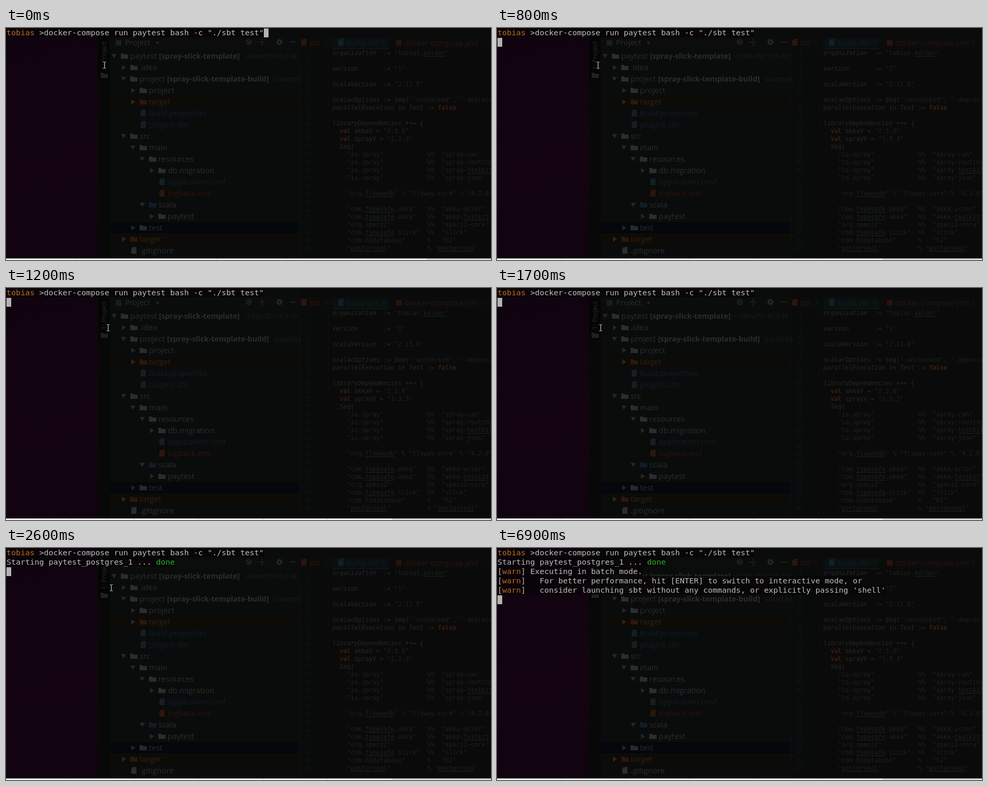
An HTML page that plays this animation: 933 by 446 pixels, repeating every 8 s.

```html
<!DOCTYPE html>
<html lang="en">
<head>
<meta charset="utf-8">
<title>Terminal test run</title>
<style>
html, body { margin: 0; width: 100%; height: 100%; overflow: hidden; background: #0a0a0a; }
#stage { position: absolute; left: 0; top: 0; width: 933px; height: 446px; overflow: hidden; background: #0a0a0a; }
#stage > * { position: absolute; }
#wall { left: 0; top: 0; width: 177px; height: 443px; background: linear-gradient(170deg, #100310, #140412 60%, #11030f); }
#ide { left: 0; top: 0; font: 15px "Open Sans", "Noto Sans", sans-serif; }
#ide > :not(rect) { opacity: .6; }
pre { margin: 0; top: 41px; font: 11.63px/15px "DejaVu Sans Mono", monospace; color: #343638; opacity: .65; }
#code { left: 628px; }
#code b { color: #52290f; font-weight: 400; }
#code b.lit { font-weight: 700; }
#code s { color: #272e28; text-decoration: none; }
#code u { text-decoration: underline #1a3a26; text-underline-offset: 2px; }
#nums { left: 568px; width: 18px; text-align: right; font-size: 10px; color: #111d1b; }

.row { left: 1px; height: 18px; white-space: pre; color: #bebeba; background: rgba(8, 6, 8, .78);
  font: 14.95px/18px "DejaVu Sans Mono", monospace; }
.row i { font-style: normal; color: #bd6c1c; }
.row em { font-style: normal; color: #2cb42c; }
.row, #caret, #mouse, .bar { animation: 8s step-end infinite; }
.second { animation-name: second; }
.later { animation-name: later; }
#caret { left: 1px; top: 1px; width: 9px; height: 17px; background: #b4b4b2; animation-name: caret; }
#mouse { left: -3px; top: -7px; animation-name: mouse; }
.bar { left: 0; top: 443px; width: 933px; height: 3px; background: #d6d6d4; }
.bar::before { content: ""; position: absolute; height: 3px; width: calc(6 * var(--w));
  background: repeating-linear-gradient(90deg, #f2f2f0 0 calc(var(--w) - 1px), #c8c8c6 0 var(--w)); }
#before { --w: 135.2px; }
#after { --w: 123.8px; animation-name: after; }

@keyframes second { 0% { opacity: 0 } 32.5%, 100% { opacity: 1 } }
@keyframes later { 0% { opacity: 0 } 45%, 100% { opacity: 1 } }
@keyframes after { 0% { opacity: 0 } 10%, 100% { opacity: 1 } }
@keyframes caret {
  0% { transform: translate(495px, 0) }
  2.5% { transform: translate(0, 18px) }
  32.5% { transform: translate(0, 36px) }
  45%, 100% { transform: translate(0, 90px) }
}
@keyframes mouse {
  0% { transform: translate(189px, 71px) }
  2.5% { transform: translate(192px, 71px) }
  10% { transform: translate(194px, 71px) }
  11.25% { transform: translate(195px, 72px) }
  12.5% { transform: translate(195px, 74px) }
  13.75% { transform: translate(196px, 75px) }
  15% { transform: translate(196px, 76px) }
  21.25% { transform: translate(199px, 76px) }
  22.5% { transform: translate(201px, 76px) }
  27.5% { transform: translate(202px, 76px); opacity: 1 }
  86.25%, 100% { transform: translate(202px, 76px); opacity: 0 }
}
</style>
</head>
<body>
<div id="stage">
  <div id="wall"></div>
  <svg id="ide" width="933" height="446"></svg>
  <pre id="nums"></pre>
  <pre id="code"><i>organization</i>  := <s>"tobias.<u>kelder</u>"</s>

<i>version</i>       := <s>"1"</s>

<i>scalaVersion</i>  := <s>"2.11.8"</s>

<i>scalacOptions</i> := <i>Seq</i>(<s>"-unchecked"</s>, <s>"-deprecation"</s>
<i>parallelExecution</i> in <i>Test</i> := <b class="lit">false</b>

<i>libraryDependencies</i> ++= {
  <b class="lit">val</b> akkaV = <s>"2.3.9"</s>
  <b class="lit">val</b> sprayV = <s>"1.3.3"</s>
  <i>Seq</i>(
<s>    "io.spray"            %%  "spray-can"
    "io.spray"            %%  "spray-routing"
    "io.spray"            %%  "spray-<u>testkit</u>"
    "io.spray"            %%  "spray-json"

    "org.<u>flywaydb</u>" % "flyway-core" % "4.2.0"

    "com.<u>typesafe</u>.akka"   %%  "akka-actor"
    "com.<u>typesafe</u>.akka"   %%  "akka-<u>testkit</u>"
    "org.specs2"          %%  "specs2-core"
    "com.<u>typesafe</u>.slick"  %%  "slick"
    "com.h2database"      %   "h2"
    "<u>postgresql</u>"          % "<u>postgresql</u>"</s></pre>

  <div class="row" style="top:0"><i>tobias</i> &gt;docker-compose run paytest bash -c "./sbt test"</div>
  <div class="row second" style="top:18px">Starting paytest_postgres_1 ... <em>done</em></div>
  <div class="row later" style="top:36px">[<i>warn</i>] Executing in batch mode.</div>
  <div class="row later" style="top:54px">[<i>warn</i>]   For better performance, hit [ENTER] to switch to interactive mode, or</div>
  <div class="row later" style="top:72px">[<i>warn</i>]   consider launching sbt without any commands, or explicitly passing 'shell'</div>
  <div id="caret"></div>
  <div class="bar" id="before"></div>
  <div class="bar" id="after"></div>
  <svg id="mouse" width="7" height="15" fill="none">
    <path d="M1 1.5h5M3.5 1v13M1 13.5h5" stroke="#000" stroke-width="2" opacity=".6"/>
    <path d="M1 1.5h2M4 1.5h2M3.5 2v11M1 13.5h2M4 13.5h2" stroke="#eee"/>
  </svg>
</div>
<script>
const GREY = '#404244', BLUE = '#14293b', RED = '#461a0d', BROWN = '#42301c', RUST = '#42200c', STEEL = '#1a2b36';
const parts = [];
const rect = (x, y, w, h, fill, r = 0) =>
  parts.push(`<rect x="${x}" y="${y}" width="${w}" height="${h}" rx="${r}" fill="${fill}"/>`);
const path = (d, fill, stroke = 'none') => parts.push(`<path d="${d}" fill="${fill}" stroke="${stroke}"/>`);
const text = (x, y, s, fill, extra = '') => parts.push(`<text x="${x}" y="${y}" fill="${fill}" ${extra}>${s}</text>`);
const folder = (x, y, fill) => path(`M${x} ${y - 5}h5l2 2h7v8h-14z`, fill);
const file = (x, y, fill) => path(`M${x + 5} ${y - 7}h7v13h-10v-10z`, fill);
const arrow = (x, y, open) => path(open ? `M${x - 5} ${y - 4}h10l-5 8z` : `M${x - 3} ${y - 5}l8 5l-8 5z`, '#37393a');
const cross = (x, y) => path(`M${x - 3} ${y - 3}l6 6m0 -6l-6 6`, 'none', '#222');

// Panels
rect(177, 0, 23, 443, '#080808');
rect(177, 18, 22, 81, '#050505');
rect(200, 0, 366, 443, '#0a0b0b');
rect(200, 18, 366, 23, '#0b0c0c');
rect(200, 131, 366, 22, '#0d0b08');
rect(200, 373, 366, 22, '#04070b');
rect(200, 395, 366, 22, '#0d0b08');
rect(566, 18, 367, 23, '#0a0b0b');
rect(566, 41, 54, 402, '#090b0b');
rect(620, 41, 1, 402, '#0d1010');
rect(628, 18, 108, 23, '#0a0f0f');
rect(628, 39, 108, 2, '#0b1615');
rect(564, 41, 3, 402, '#090e0d');

// Side tab and tool header
text(0, 0, '1: Project', GREY, 'font-size="12.5" transform="translate(193 80) rotate(-90)"');
folder(182, 91, '#303234');
rect(211, 23, 11, 11, '#181d1e', 1);
text(229, 33, 'Project', GREY);
path('M288 27h7l-3.5 4z', GREY);
parts.push('<g fill="none" stroke="#35383a" stroke-width="1.5"><circle cx="467" cy="27" r="5"/>' +
  '<path d="M464 24l6 6m0 -6l-6 6M487 27h11M492.5 20v5M492.5 29v5M546 27h11"/>' +
  '<circle cx="526" cy="27" r="3.5" stroke-width="3"/><circle cx="526" cy="27" r="5.5" stroke-dasharray="2 2.3"/></g>');

// Editor tabs
file(566, 28, RED);
text(583, 34, 'sbt', RED);
cross(615, 28);
file(637, 28, BLUE);
text(655, 34, 'build.sbt', '#14282f');
cross(727, 28);
rect(750, 23, 11, 11, '#2a120b', 1);
text(766, 34, 'docker-compose.yml', RED, 'font-size="14.6"');
cross(917, 28);

// Project tree: depth, name, state (o open, c closed, f file), ink, icon tint, bold suffix, note, note x
const tree = [
  [0, 'paytest', 'o', GREY, GREY, '[spray-slick-template]', '~/dev/form3-te', 456],
  [1, '.idea', 'c', GREY, GREY],
  [1, 'project', 'o', GREY, GREY, '[spray-slick-template-build]', 'sources', 515],
  [2, 'project', 'c', GREY, GREY],
  [2, 'target', 'c', BROWN, RUST],
  [2, 'build.properties', 'f', BLUE, STEEL],
  [2, 'plugins.sbt', 'f', BLUE, STEEL],
  [1, 'src', 'o', GREY, GREY],
  [2, 'main', 'o', GREY, GREY],
  [3, 'resources', 'o', GREY, GREY],
  [4, 'db.migration', 'c', GREY, GREY],
  [4, 'application.conf', 'f', BLUE, STEEL],
  [4, 'logback.xml', 'f', RED, RUST],
  [3, 'scala', 'o', GREY, BLUE],
  [4, 'paytest', 'c', GREY, GREY],
  [2, 'test', 'c', GREY, GREY],
  [1, 'target', 'c', BROWN, RUST],
  [1, '.gitignore', 'f', GREY, GREY]
];
tree.forEach(([depth, name, state, ink, tint, bold, note, noteX], i) => {
  const x = 239 + 18 * depth, y = 54 + 22 * i;
  if (state === 'f') file(x - 18, y, tint);
  else {
    arrow(x - 31, y, state === 'o');
    folder(x - 18, y, tint);
  }
  const suffix = bold ? ` <tspan font-size="14.3" font-weight="700">${bold}</tspan>` : '';
  text(x, y + 5, name + suffix, ink);
  if (note) text(noteX, y + 5, note, '#232526');
});

document.getElementById('ide').innerHTML = parts.join('');
document.getElementById('nums').textContent = Array.from({ length: 26 }, (_, i) => i + 1).join('\n');
</script>
</body>
</html>
```
